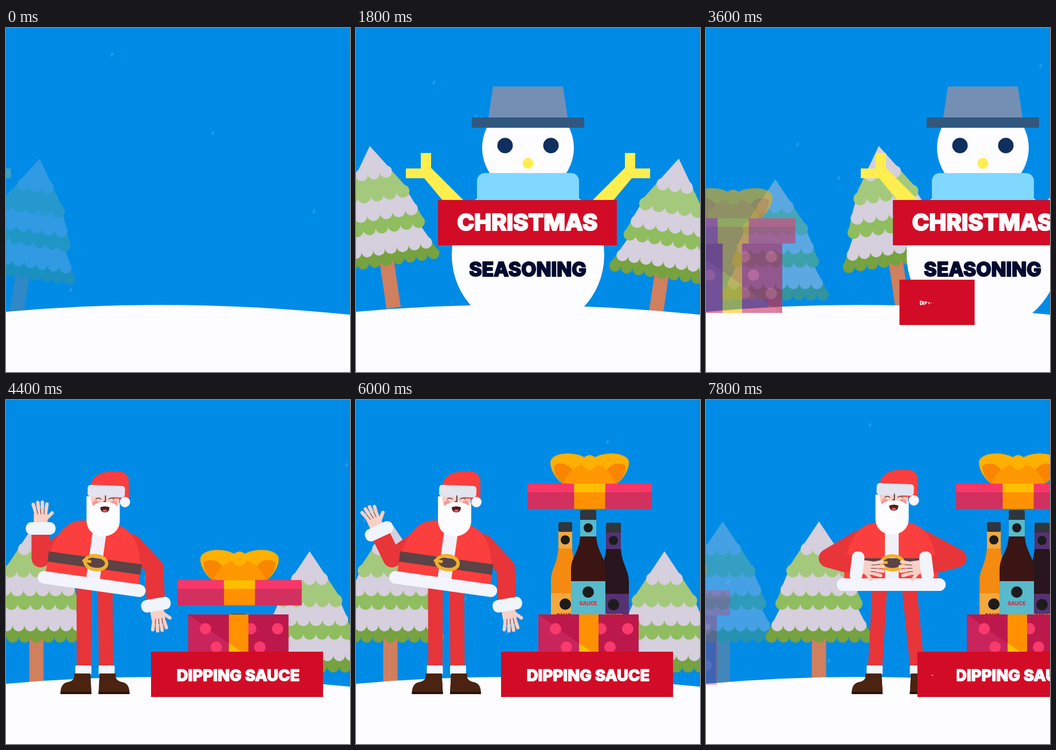
Recreate the animation shown at these times as an HTML page with a canvas. Size 600x600 px, loop 8000 ms.

```html
<!DOCTYPE html>
<html lang="en">
<head>
<meta charset="utf-8">
<title>Christmas sauces</title>
<style>
html, body { margin: 0; height: 100%; overflow: hidden; background: #008be6; }
canvas { display: block; width: 100vw; height: 100vh; }
</style>
</head>
<body>
<canvas id="stage" width="600" height="600"></canvas>
<script>
const stage = document.getElementById('stage').getContext('2d');
const layer = document.createElement('canvas').getContext('2d');
layer.canvas.width = layer.canvas.height = 600;

const LOOP = 8000, STEP = 200, PAN = 1450;
const SCENES = [-379, 3060, 7340];
const WHITE = '#fdfcff', RED = '#fb3f3e', DARK_RED = '#e73539', SKIN = '#f8d0c7', LABEL = '#d20c26';
let c = stage, time = 0;

const clamp = v => Math.max(0, Math.min(1, v));
const smooth = v => (1 - Math.cos(Math.PI * clamp(v))) / 2;
const lerp = (a, b, k) => a + (b - a) * k;
const panPart = (start, lead = 0) => (time - start + lead) / PAN;

function rect(x, y, w, h, color, r = 0) {
  c.fillStyle = color;
  c.beginPath();
  c.roundRect(x, y, w, h, r);
  c.fill();
}
function oval(x, y, rx, ry, color, turn = 0) {
  c.fillStyle = color;
  c.beginPath();
  c.ellipse(x, y, rx, ry, turn, 0, 7);
  c.fill();
}
const dot = (x, y, r, color) => oval(x, y, r, r, color);
function shape(d, color) {
  c.fillStyle = color;
  c.fill(new Path2D(d));
}
function line(d, color, width) {
  c.strokeStyle = color;
  c.lineWidth = width;
  c.lineCap = c.lineJoin = 'round';
  c.stroke(new Path2D(d));
}
function at(x, y, degrees, draw) {
  c.save();
  c.translate(x, y);
  c.rotate(degrees * Math.PI / 180);
  draw();
  c.restore();
}

// Elements ride the pan in from the left and leave to the right.
function item(scene, leadIn, leadOut, draw) {
  const enter = smooth(panPart(SCENES[scene], leadIn));
  const leave = scene < 2 ? smooth(panPart(SCENES[scene + 1], leadOut)) : 0;
  if (!enter || leave === 1) return;
  layer.clearRect(0, 0, 600, 600);
  c = layer;
  at(600 * (enter - 1 + leave), 0, 0, draw);
  c = stage;
  c.globalAlpha = clamp(enter * 1.4);
  c.drawImage(layer.canvas, 0, 0);
  c.globalAlpha = 1;
}

function scallops(top, topHalf, base, half, color) {
  shape(`M${-topHalf},${top}H${topHalf}L${half},${base}H${-half}Z`, color);
  const n = Math.round(half / 10.5), r = half / n;
  for (let i = 0; i < n; i++) dot(-half + r * (2 * i + 1), base, r, color);
}
function tree(x, y, tilt = 0) {
  at(x, y, tilt, () => {
    const snow = '#d6cfdd';
    rect(-12.5, 195, 25, 90, '#d07f5f');
    scallops(140, 62, 201, 93, '#76a240');
    scallops(140, 62, 181, 83, snow);
    scallops(80, 50, 143, 76, '#8fbd5f');
    scallops(80, 50, 119, 67, snow);
    scallops(0, 0, 86, 57, '#a4c97d');
    scallops(0, 0, 48, 32, snow);
  });
}

function snowman() {
  for (const side of [1, -1]) {
    c.save();
    c.translate(300, 0);
    c.scale(side, 1);
    shape('M-187,218H-169V244L-112,301V316H-136L-181,262H-213V245H-187Z', '#ffee4f');
    c.restore();
  }
  dot(300, 396, 133, WHITE);
  dot(300, 209, 80, WHITE);
  shape('M239,102H361L369,156H231Z', '#7390b4');
  rect(202, 156, 196, 18, '#30587f');
  dot(260, 205, 13.5, '#0f2f5f');
  dot(340, 205, 13.5, '#0f2f5f');
  dot(300, 236, 9.5, '#ffee4f');
  rect(211, 253, 178, 48, '#80d8ff', [14, 14, 2, 2]);
}

function bow() {
  for (const side of [1, -1]) {
    c.save();
    c.scale(side, 1);
    shape('M0,-40C-20,-58-62,-56-68,-40C-71,-26-56,-4-46,0H0Z', '#ffb000');
    shape('M-62,-32C-44,-42-24,-28-22,0H-46C-55,-5-64,-20-62,-32Z', '#f98500');
    shape('M0,-34C-22,-38-42,-14-45,-3C-30,4-18,0 0,0Z', '#ff9700');
    c.restore();
  }
  shape('M-15,-40Q0,-60 15,-40Q10,-24 0,-24Q-10,-24-15,-40Z', '#ffb000');
}

function bottle(x, top, neck, half, liquid, paper, ink) {
  const body = top + 105;
  shape(`M${x - neck},${top + 14}H${x + neck}V${top + 45}C${x + neck + 2},${top + 75} ${x + half},${top + 80} ${x + half},${body}V400H${x - half}V${body}C${x - half},${top + 80} ${x - neck - 2},${top + 75} ${x - neck},${top + 45}Z`, liquid);
  rect(x - neck, top, neck * 2, 17, '#30363b', 3);
  rect(x - neck, top + 17, neck * 2, 29, paper);
  dot(x, top + 31, 8, '#1c1c1c');
  rect(x - half, top + 124, half * 2, 90, paper);
  dot(x, top + 143, 10, '#1c1c1c');
  c.fillStyle = ink;
  c.font = '800 9px Inter, sans-serif';
  c.textAlign = 'center';
  c.fillText('SAUCE', x, top + 166);
}

function gift(rise) {
  c.save();
  c.beginPath();
  c.rect(300, 0, 220, 374);
  c.clip();
  c.translate(0, 200 * (1 - rise));
  if (rise > 0) {
    bottle(365, 213, 12, 25, '#f58a10', '#f3a83e', '#8a1f14');
    bottle(449, 214, 13, 27, '#28151d', '#553272', '#f0c64a');
    bottle(405, 192, 14, 30, '#3b1513', '#58bacb', '#d92c3a');
  }
  c.restore();

  rect(318, 374, 175, 123, '#bd184b');
  shape('M318,374L490,497H318Z', '#c9245b');
  for (const [x, y] of [[348, 399], [427, 399], [474, 399], [367, 431], [443, 431], [348, 463], [427, 463], [474, 463]])
    dot(x, y, 10, '#f83a6c');
  rect(389, 374, 34, 123, '#ff9100');
  shape('M389,424L423,448V497H389Z', '#ffbf00');

  at(407.5, 332 - 186 * rise, 0, () => {
    bow();
    rect(-108.5, 0, 217, 44, '#d2305e');
    rect(-108.5, 0, 217, 15, '#f83768');
    rect(-27, 0, 54, 44, '#ff9100');
    rect(-27, 0, 54, 15, '#ffbf00');
  });
}

function hand(x, y, angle, side) {
  at(x, y, angle, () => {
    c.scale(side, 1);
    rect(-12, -32, 24, 30, SKIN, 7);
    for (let i = 0; i < 4; i++)
      line(`M${-8 + 5.5 * i},-26L${-13 + 8 * i},${-42 - 4 * Math.sin(i)}`, SKIN, 6);
    line('M8,-15L20,-27', SKIN, 6);
    for (let i = 0; i < 3; i++)
      line(`M${-5 + 5.5 * i},-25L${-7 + 6.5 * i},-34`, '#50363b', 1);
    rect(-26, -11, 52, 22, '#f0f4fb', 10);
  });
}

function head() {
  rect(-24, 160, 52, 45, SKIN);
  dot(38, 180, 7, SKIN);
  shape('M-22,153C-20,132-5,125 15,125H30Q45,127 45,145V172H20Z', RED);
  at(5, 158, 2, () => rect(-32, -9, 65, 20, '#e3e4ef', 5));
  dot(38, 178, 9, '#f7f6fc');
  shape('M-29,168H-22Q-22,188-8,188H14Q26,188 26,180H29V210C29,247-29,247-29,210Z', WHITE);
  dot(-13, 181, 6, '#f59a95');
  dot(19, 181, 6, '#f59a95');
  oval(-6, 184, 12, 5, WHITE, -0.25);
  oval(13, 184, 12, 5, WHITE, 0.25);
  shape('M-5,187Q3,184 11,187Q11,196 3,196Q-5,196-5,187Z', '#4a2024');
  oval(3, 193, 4, 2, '#ef5a58');
  line('M4,167V177H1', '#33242b', 1.6);
  line('M-13,173Q-8,169-4,173M10,173Q14,169 19,173', '#5b3b3d', 1.2);
}

function leg(hipX, kneeX, side) {
  shape(`M${hipX - 13},318H${hipX + 13}L${kneeX + 12.5},466H${kneeX - 12.5}Z`, DARK_RED);
  at(kneeX, 463, 0, () => {
    c.scale(side, 1);
    rect(-13, 0, 28, 16, '#f4f5fc', 2);
    shape('M-11,14H17V49H-13Z', '#4a2311');
    shape('M-11,14H15Q16,27 28,29Q41,31 41,49H-13Z', '#4a2311');
    rect(-13, 46, 54, 4, '#29110b');
  });
}

function santa() {
  const k = smooth((time - 6300) / 600);
  const mix = (a, b) => lerp(a, b, k);
  const wave = -12.5 + 12.5 * Math.cos(2 * Math.PI * (time - 4400) / 1067);
  const rad = wave * Math.PI / 180;
  const bob = k * 3.5 * (Math.cos(Math.PI * (time - 7200) / 200) - 1);
  const left = {
    elbow: [mix(63, 45), mix(276, 283)],
    wrist: [mix(63 + 54 * Math.sin(rad), 96), mix(278 - 54 * Math.cos(rad), 297)]
  };
  const right = {
    elbow: [mix(261, 271), mix(292, 283)],
    wrist: [mix(264, 217), mix(357, 297)]
  };

  leg(mix(138.5, 136), mix(138.5, 127.5), -1);
  leg(mix(175.5, 186), mix(177, 201), 1);

  at(0, bob, 0, () => {
    line(`M100,250L${left.elbow}L${left.wrist}`, DARK_RED, 32);
    line(`M${mix(222, 210)},250L${right.elbow}L${right.wrist}`, DARK_RED, 32);
    at(mix(152, 155.5), mix(321, 329), mix(8, 0), () => {
      shape('M-82,0C-84,-70-60,-108-25,-108H25C60,-108 84,-70 82,0Z', RED);
      rect(-11, -96, 24, 90, '#f1f0f8');
      rect(-82, -46, 164, 18, '#5b4346');
      c.strokeStyle = '#eeb12e';
      c.lineWidth = 6;
      c.beginPath();
      c.ellipse(2, -38, 19, 12, 0, 0, 7);
      c.stroke();
      rect(-22, -41, 16, 5, '#eeb12e', 2);
      rect(-95, -11, 190, 22, '#f3f4fc', 11);
    });
    if (k > 0.5) {
      line(`M${left.elbow}L${left.wrist}`, DARK_RED, 30);
      line(`M${right.elbow}L${right.wrist}`, DARK_RED, 30);
    }
    hand(...left.wrist, mix(wave, 97), 1);
    hand(...right.wrist, mix(170, 263), -1);
    at(mix(172, 157), mix(0, 4), 0, head);
  });
}

// Labels and lettering open in place while the scenery pans.
function opening(scene) {
  return clamp((panPart(SCENES[scene]) - 0.265) / 0.43);
}
function label(scene, x, y, w) {
  const v = opening(scene), width = w * (1 - (1 - v) ** 2);
  const leave = scene < 2 ? smooth(panPart(SCENES[scene + 1])) : 0;
  rect(x - width / 2 + 600 * leave, y, width, 79, LABEL);
}
function lettering(scene, text, x, baseline, size, color) {
  const v = opening(scene), scale = clamp(1.5 * (v - 0.05));
  const leave = scene < 2 ? smooth(panPart(SCENES[scene + 1])) : 0;
  if (!scale || leave === 1) return;
  c.font = `800 ${size}px Inter, sans-serif`;
  c.textAlign = 'center';
  c.fillStyle = c.strokeStyle = color;
  c.lineWidth = size / 18;
  c.lineJoin = 'round';
  const total = c.measureText(text).width, middle = size * 0.36;
  c.save();
  c.translate(x + 600 * leave, baseline - middle);
  c.scale(scale, scale);
  [...text].forEach((letter, i) => {
    const grow = clamp(0.2 + 4 * v - 0.22 * i);
    if (!grow) return;
    const end = c.measureText(text.slice(0, i + 1)).width;
    c.save();
    c.translate(end - c.measureText(letter).width / 2 - total / 2, 0);
    c.scale(grow, grow);
    c.fillText(letter, 0, middle);
    c.strokeText(letter, 0, middle);
    c.restore();
  });
  c.restore();
}

function flakes() {
  for (let i = 0; i < 4; i++) {
    const x = (185 + i * 176 + time * 0.013) % 600;
    const y = (46 + i * 137 + time * 0.06) % 470;
    oval(x, y, 2, 4, 'rgba(255,255,255,.13)', 0.4);
  }
}

function draw() {
  rect(0, 0, 600, 600, '#008be6');
  flakes();
  item(0, 0, 0, () => tree(563, 228, 8.4));
  item(0, 0, 150, () => tree(24, 206, -8.4));
  item(1, 0, 0, () => tree(538, 264));
  item(1, 10, 0, () => tree(60, 212));
  item(2, 0, 0, () => tree(492, 212));
  shape('M0,495Q285,468.5 600,500V600H0Z', WHITE);

  item(0, 0, 0, snowman);
  label(0, 299, 300, 312);
  lettering(0, 'CHRISTMAS', 299, 353, 40, WHITE);
  lettering(0, 'SEASONING', 299.5, 433, 34, '#020a30');

  item(1, 92, 0, () => gift(smooth((time - 4200) / 1000)));
  item(1, 50, 54, santa);
  label(1, 403, 439, 300);
  lettering(1, 'DIPPING SAUCE', 405, 490, 27.5, WHITE);

  item(2, 0, 0, () => at(-11, 0, 0, () => gift(0)));
  label(2, 403, 439, 300);
  lettering(2, 'DIPPING SAUCE', 405, 490, 27.5, WHITE);
}

function tick() {
  time = Math.floor(performance.now() % LOOP / STEP) * STEP;
  draw();
  requestAnimationFrame(tick);
}
tick();
</script>
</body>
</html>
```
